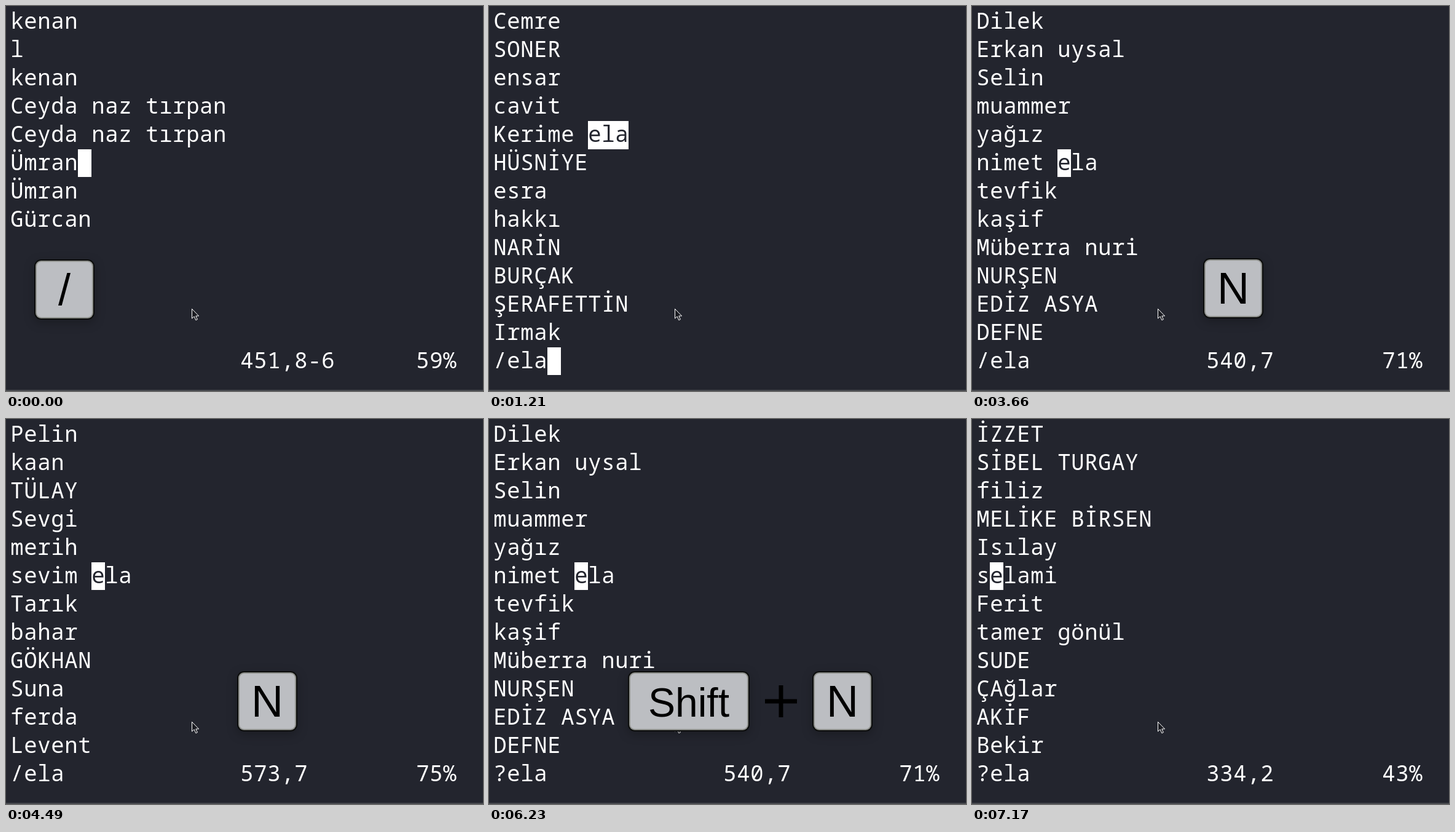
Write an HTML page that moves like this. It is 776 by 626 pixels and loops after 7440 ms.

```html
<!DOCTYPE html>
<html lang="tr">
<head>
<meta charset="utf-8">
<style>
html, body { margin: 0; width: 100%; height: 100%; overflow: hidden; background: #23252e; }
svg { display: block; width: 776px; height: 626px; }
#term { font: 35.6px "Noto Sans Mono", monospace; letter-spacing: .64px; fill: #fff; }
#term text { white-space: pre; }
#keys { font-family: "Liberation Sans", Arial, sans-serif; text-anchor: middle; }
.cap { filter: drop-shadow(0 5px 8px rgba(0, 0, 0, .25)); }
</style>
</head>
<body>
<svg viewBox="0 0 776 626">
  <rect width="776" height="626" fill="#23252e"/>
  <rect y="624" width="776" height="2" fill="#45474c"/>
  <g id="term"></g>
  <path d="M302.5 492.5v15.5l3.6-3.2 2.7 6 2.6-1.2-2.6-5.6h4.8z" fill="#1b1c22" stroke="#fff"/>
  <g id="keys"></g>
</svg>
<script>
const LOOP = 7440, COL = 22, ROW = 46, INK = '#23252e';
const term = document.getElementById('term'), keys = document.getElementById('keys');

const list = s => s.split(',');
const first = list('Cemre,SONER,ensar,cavit,Kerime ela,HÜSNİYE,esra,hakkı,NARİN,BURÇAK,ŞERAFETTİN,Irmak');

// rows, cursor row and column, ruler, percent
const screens = {
  start: [list('kenan,l,kenan,Ceyda naz tırpan,Ceyda naz tırpan,Ümran,Ümran,Gürcan'), 5, 5, '451,8-6', '59%'],
  first: [first, 4, 7, '458,8', '60%'],
  second: [list('Dilek,Erkan uysal,Selin,muammer,yağız,nimet ela,tevfik,kaşif,Müberra nuri,NURŞEN,EDİZ ASYA,DEFNE'), 5, 6, '540,7', '71%'],
  third: [list('Pelin,kaan,TÜLAY,Sevgi,merih,sevim ela,Tarık,bahar,GÖKHAN,Suna,ferda,Levent'), 5, 6, '573,7', '75%'],
  fourth: [list('vedat,Ela,Songül,NURAY,cihan,ela,zekiye,gökçen,Remzi,nazım,ŞÜKRİYE,Nesli'), 5, 0, '602,1', '79%'],
  back: [['Gürcan', ...first.slice(0, 11)], 5, 7, '458,8', '60%'],
  last: [list('İZZET,SİBEL TURGAY,filiz,MELİKE BİRSEN,Isılay,selami,Ferit,tamer gönül,SUDE,ÇAğlar,AKİF,Bekir'), 5, 1, '334,2', '43%']
};

// time, screen, command line, key shown, typing, match length
const steps = [
  [0, 'start', '', '/'],
  [330, 'start', '/', '/', true, 0],
  [600, 'start', '/', '', true, 0],
  [1000, 'start', '/e', '', true, 0],
  [1070, 'first', '/el', '', true, 2],
  [1210, 'first', '/ela', '', true, 3],
  [1940, 'first', '/ela', 'Enter', true, 3],
  [2070, 'first', '/ela', 'Enter'],
  [2530, 'first', '/ela', ''],
  [3060, 'first', '/ela', 'N'],
  [3130, 'second', '/ela', 'N'],
  [3460, 'second', '/ela', ''],
  [3660, 'second', '/ela', 'N'],
  [3860, 'third', '/ela', 'N'],
  [4060, 'third', '/ela', ''],
  [4490, 'third', '/ela', 'N'],
  [4560, 'fourth', '/ela', 'N'],
  [4960, 'fourth', '/ela', ''],
  [5560, 'fourth', '/ela', 'Shift+N'],
  [5630, 'third', '?ela', 'Shift+N'],
  [5960, 'third', '?ela', ''],
  [6160, 'third', '?ela', 'Shift+N'],
  [6230, 'second', '?ela', 'Shift+N'],
  [6560, 'second', '?ela', ''],
  [6690, 'back', '?ela', 'Shift+N'],
  [7100, 'back', '?ela', ''],
  [7170, 'last', '?ela', '']
];

const text = (s, col, row, fill = '#fff') =>
  `<text x="${7.3 + col * COL}" y="${37 + row * ROW}" fill="${fill}">${s}</text>`;

// inverted cells
const block = (s, col, row, len, h) =>
  `<rect x="${7 + col * COL}" y="${3 + row * ROW}" width="${len * COL}" height="${h}"/>` +
  text(s.slice(col, col + len), col, row, INK);

const cap = (label, cx, cy, w, size) => `<g class="cap">
  <rect x="${cx - w / 2}" y="${cy - 49}" width="${w}" height="98" rx="11" fill="#0c0d0c"/>
  <rect x="${cx - w / 2 + 2}" y="${cy - 47}" width="${w - 4}" height="94" rx="9" fill="#8f918d"/>
  <rect x="${cx - w / 2 + 4}" y="${cy - 45}" width="${w - 8}" height="90" rx="7" fill="#bcbec2"/></g>
  <text x="${cx}" y="${cy + 25}" font-size="${size}">${label}</text>`;

const keyArt = {
  '': '',
  '/': cap('/', 95, 461, 98, 72),
  'N': cap('N', 425, 459, 98, 72),
  'Enter': cap('Enter', 425, 459, 198, 66),
  'Shift+N': cap('Shift', 325, 459, 198, 66) + cap('N', 575, 459, 98, 72) +
    '<path d="M449 459h52M475 433v52" stroke="#000" stroke-width="7"/>'
};

function draw([, name, cmd, key, typing, match]) {
  const [rows, row, col, ruler, percent] = screens[name];
  let out = rows.map((s, i) => text(s, 0, i)).join('') + text(cmd, 0, 12);
  if (typing) {
    if (match) out += block(rows[row], col, row, match, 46);
    out += block('', cmd.length, 12, 1, 45);
  } else {
    out += block(rows[row], col, row, 1, 45) + text(ruler, 17, 12) + text(percent, 30, 12);
  }
  term.innerHTML = out;
  keys.innerHTML = keyArt[key];
}

let shown;
const begin = performance.now();
function tick() {
  const t = (performance.now() - begin) % LOOP;
  const step = steps.findLast(s => s[0] <= t);
  if (step !== shown) draw(shown = step);
  requestAnimationFrame(tick);
}
tick();
</script>
</body>
</html>
```
